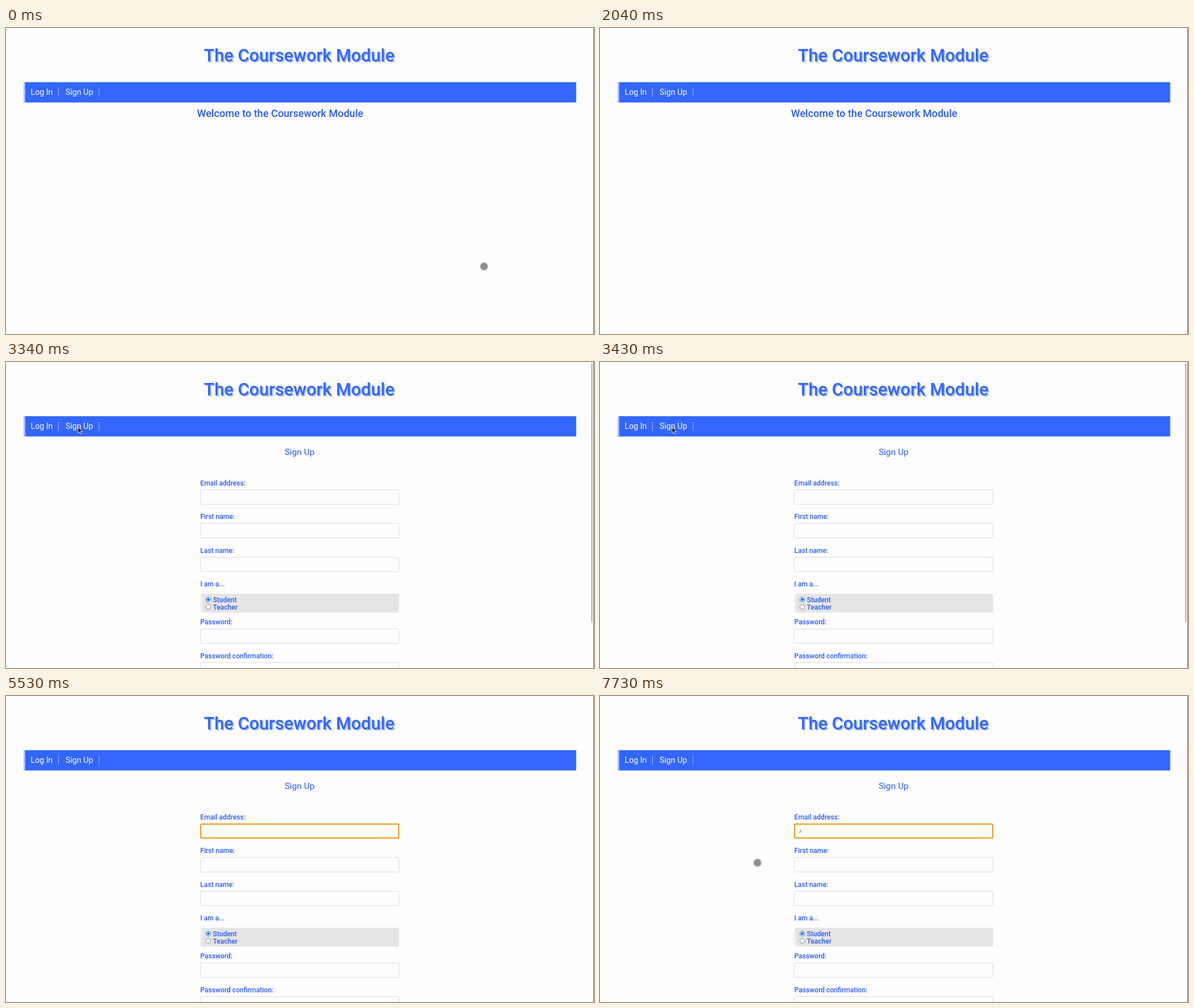
Animation, 1036 px wide and 540 px high, one loop 8000 ms. Source, as an HTML page:

```html
<!DOCTYPE html>
<html lang="en">
<head>
<meta charset="utf-8">
<title>Sign up</title>
<style>
html, body { margin: 0; width: 100%; height: 100%; overflow: hidden; background: #fefefe; }
svg { display: block; font-family: Roboto, "Open Sans", sans-serif; }
.mid { text-anchor: middle; }
.title { font-size: 30.75px; font-weight: 500; }
.blue { fill: #36f; }
.pale { fill: #a9bfff; }
.nav { font-size: 14.2px; fill: #fff; }
.welcome { font-size: 18.1px; font-weight: 500; fill: #2e5cf6; }
.heading { font-size: 15.5px; fill: #2e5cf6; }
.label { font-size: 12.1px; font-weight: 500; fill: #2e5cf6; }
.field { fill: #fefefe; stroke: #dcdcdc; }
.dots { fill: #8f8f8f; stroke: #c6c6c6; stroke-width: 1.4px; }

/* One loop is 8 s, so 1% is 80 ms */
.anim, .tap { animation: 8s step-end infinite; }
#home { animation-name: home; }
#signup { animation-name: signup; }
#hover { animation-name: hover; stroke: #fff; stroke-width: .25px; }
#scrollbar { animation-name: scrollbar; }
#focus { animation-name: focus; }
#caret { animation-name: caret; }
#typed { animation-name: typed; font-size: 8px; fill: #444; }
#arrow { animation-name: arrow; }
#navRest { animation-name: navRest; }
#formRest { animation-name: formRest; }

/* Each pointer stop flashes at its own time --t */
.tap { opacity: 0; animation-name: tap; animation-delay: var(--t); }

@keyframes tap { 0% { opacity: 1 } .75% { opacity: .5 } 2%, 100% { opacity: 0 } }
@keyframes home { 0% { opacity: 1 } 41.75%, 100% { opacity: 0 } }
@keyframes signup { 0% { opacity: 0 } 41.75%, 100% { opacity: 1 } }
@keyframes hover { 0% { opacity: 0 } 33.125% { opacity: .5 } 36.5% { opacity: 1 } 41.75%, 100% { opacity: 0 } }
@keyframes scrollbar {
  0% { opacity: 0 } 41.75% { opacity: 1 } 47% { opacity: .5 } 48.125%, 100% { opacity: 0 }
}
@keyframes focus {
  0% { opacity: 0 } 62.125% { opacity: .4 } 62.9% { opacity: .75 } 63.625%, 100% { opacity: 1 }
}
@keyframes caret {
  0% { opacity: 0; transform: none }
  62.9% { opacity: 1 }
  69.125% { opacity: 0 }
  75.125% { opacity: 1 }
  81.125% { opacity: 0 }
  87.75% { opacity: 1; transform: none }
  90.5% { opacity: 1; transform: translate(2.5px, 0) }
  96.625%, 100% { opacity: 0; transform: translate(2.5px, 0) }
}
@keyframes typed { 0% { opacity: 0 } 90.5%, 100% { opacity: 1 } }
@keyframes arrow { 0% { opacity: 0 } 33.125% { opacity: 1 } 44.875%, 100% { opacity: 0 } }
@keyframes navRest { 0% { opacity: 0 } 44.875% { opacity: 1 } 51.125%, 100% { opacity: 0 } }
@keyframes formRest {
  0% { opacity: 0 } 74.75% { opacity: 1 } 87.75% { opacity: 0 } 90.5%, 100% { opacity: 1 }
}
</style>
</head>
<body>
<svg width="1036" height="540" viewBox="0 0 1036 540">
  <rect width="1036" height="540" fill="#fefefe"/>
  <rect x="1035" width="1" height="540" fill="#666"/>

  <text class="mid title pale" x="518.5" y="61.2">The Coursework Module</text>
  <text class="mid title blue" x="516.5" y="59.2">The Coursework Module</text>

  <rect class="pale" x="31" y="95" width="973.5" height="37"/>
  <rect class="blue" x="34" y="96" width="970.5" height="35"/>
  <path d="M92.5 106v15.5M164 106v15.5" stroke="#a9bfff"/>
  <text class="nav" x="43.5" y="118.4">Log In</text>
  <text class="nav" x="105" y="118.4">Sign Up</text>
  <text class="nav anim" id="hover" x="105" y="118.4">Sign Up</text>

  <g id="home" class="anim">
    <text class="mid welcome" x="483" y="157.2">Welcome to the Coursework Module</text>
  </g>

  <g id="signup" class="anim">
    <text class="mid heading" x="517.3" y="164.4">Sign Up</text>
    <g class="label">
      <text x="342.3" y="217.8">Email address:</text>
      <text x="342.3" y="277.3">First name:</text>
      <text x="342.3" y="336.8">Last name:</text>
      <text x="342.3" y="396.3">I am a...</text>
      <text x="342.3" y="463.4">Password:</text>
      <text x="342.3" y="522.9">Password confirmation:</text>
    </g>
    <g class="field">
      <rect x="342.5" y="225.5" width="350" height="25.5" rx="2"/>
      <rect x="342.5" y="285" width="350" height="25.5" rx="2"/>
      <rect x="342.5" y="344.5" width="350" height="25.5" rx="2"/>
      <rect x="342.5" y="471" width="350" height="25.5" rx="2"/>
      <rect x="342.5" y="530.5" width="350" height="25.5" rx="2"/>
    </g>
    <rect x="342.5" y="409" width="350" height="33" fill="#e5e5e5"/>
    <rect x="342.5" y="409" width="3" height="33" fill="#f1f1f1"/>
    <circle cx="356.4" cy="419.3" r="4.1" fill="#fff" stroke="#1a73e8"/>
    <circle cx="356.4" cy="419.3" r="2.5" fill="#1a73e8"/>
    <circle cx="356.4" cy="432.1" r="4.1" fill="#fff" stroke="#858585"/>
    <text class="label" x="364.4" y="423.6">Student</text>
    <text class="label" x="364.4" y="436.6">Teacher</text>
  </g>

  <rect id="focus" class="anim" x="343" y="226" width="349" height="24.5" rx="2" fill="#fefefe" stroke="#e99b12" stroke-width="2"/>
  <text id="typed" class="anim" x="350.3" y="241.3">J</text>
  <rect id="caret" class="anim" x="351" y="234" width="1" height="9" fill="#333"/>
  <rect id="scrollbar" class="anim" x="1031" y="2" width="2.5" height="457" rx="1.2" fill="#b9b9b9"/>

  <g class="dots">
    <circle class="tap" style="--t:-30ms" cx="842.3" cy="420.8" r="6.8"/>
    <circle class="tap" style="--t:680ms" cx="842" cy="419.5" r="6.8"/>
    <circle class="tap" style="--t:1370ms" cx="376.4" cy="346.4" r="6.8"/>
    <circle class="tap" style="--t:1590ms" cx="232" cy="251" r="6.8"/>
    <circle class="tap" style="--t:1810ms" cx="167" cy="190" r="6.8"/>
    <circle class="tap" style="--t:2090ms" cx="127" cy="115.5" r="6.8"/>
    <circle class="tap" style="--t:4620ms" cx="351.8" cy="243.3" r="6.8"/>
    <circle class="tap" style="--t:4790ms" cx="364.3" cy="244.3" r="6.8"/>
    <circle class="tap" style="--t:5240ms" cx="364.3" cy="244.3" r="6.8"/>
    <circle class="tap" style="--t:5370ms" cx="324" cy="259" r="6.8"/>
    <circle class="tap" style="--t:5600ms" cx="298" cy="283" r="6.8"/>
    <circle class="tap" style="--t:5790ms" cx="283" cy="298.3" r="6.8"/>
    <circle id="navRest" class="anim" cx="127" cy="115.5" r="6.8"/>
    <circle id="formRest" class="anim" cx="277.5" cy="294.3" r="6.8"/>
  </g>
  <path id="arrow" class="anim" d="M127 115v10.4l2.4-2.2 1.7 3.7 1.8-.8-1.7-3.6h3.4z" fill="#111" stroke="#fff" stroke-width=".8"/>
</svg>
</body>
</html>
```
